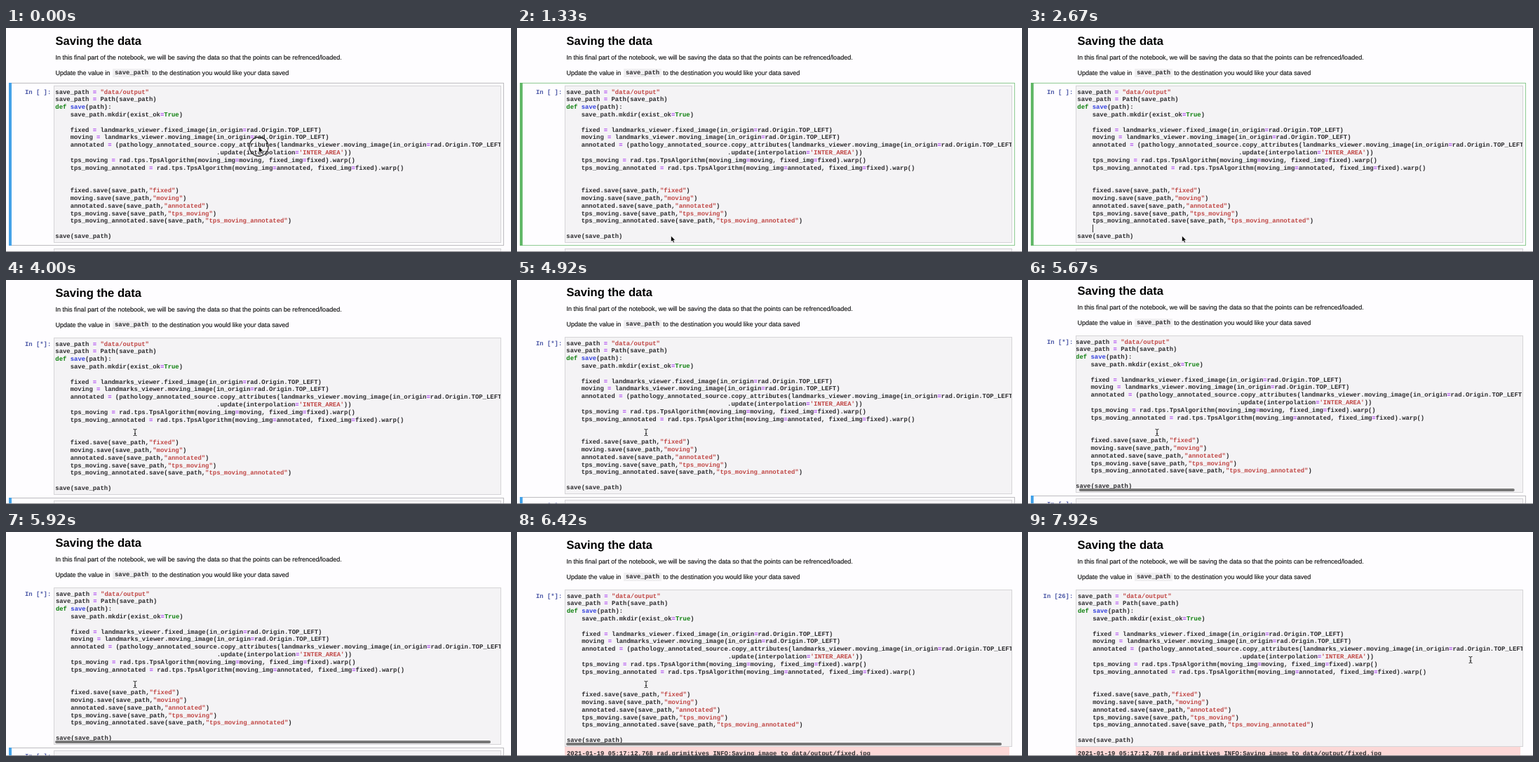
An HTML page for the animation above (8 s loop, 720x319 px).

```html
<!DOCTYPE html>
<html lang="en">
<head>
<meta charset="utf-8">
<title>Saving the data</title>
<style>
  html, body { margin: 0; width: 100%; height: 100%; overflow: hidden; background: #fefdff; }
  #stage { position: relative; width: 720px; height: 319px; overflow: hidden; color: #111;
    font: 9.06px/12px "Liberation Sans", Arial, sans-serif; text-rendering: geometricPrecision; }
  #stage :is(div, pre, h1, p, svg) { position: absolute; box-sizing: border-box; margin: 0; white-space: pre; }
  #page, #follow { left: 0; top: 0; width: 100%; height: 100%; }
  h1 { left: 70.4px; top: 8.5px; font-size: 16.6px; line-height: 20px; color: #000; }
  p { left: 70.4px; top: 58px; -webkit-text-stroke: .15px #111; }
  #stage :is(pre, .prompt, .inline) { font: bold 8.917px/10.815px "Liberation Mono", "Courier New", monospace; color: #2c2b2e; }
  #stage .inline { left: 152px; top: 58px; width: 54px; height: 12px; padding-left: 3px; line-height: 12px; background: #f0eff1; }
  .cell { left: 4px; top: 78px; width: 706px; height: 232px; border: 1px solid #bdbcc0; }
  .cell::before { content: ""; position: absolute; left: -1px; top: -1px; bottom: -1px; width: 3.5px; background: #45a2e8; }
  .edit { border-color: #8fcb93; }
  .edit::before { background: #62b868; }
  #next { top: 309.5px; height: 40px; }
  .box { left: 68px; width: 638px; overflow: hidden; background: #f4f3f5; border: 1px solid #d5d4d7; }
  #stage .prompt { right: 655.7px; top: 86.5px; color: #4b57a6; }
  #code { left: 1.3px; top: 3.5px; }
  .kw { color: #0f800f; } .fn { color: #3340dd; } .op { color: #a838f0; } .str { color: #c04644; }
  #caret { left: 92px; top: 280px; width: 1px; height: 11px; background: #333; }
  #bar { left: 70px; top: 300px; width: 620.5px; height: 4px; border-radius: 2px; background: #777; }
  #log { left: 68px; top: 306px; width: 634px; height: 40px; background: #fcd8d7; }
  #log pre { left: 3px; top: 5px; }
  #edge { left: 0; top: 318px; width: 720px; height: 1px; background: #86858a; }
  #stage svg { left: 0; top: 0; overflow: visible; }
</style>
</head>
<body>
<div id="stage">
  <div id="page">
    <h1>Saving the data</h1>
    <p style="top:36px">In this final part of the notebook, we will be saving the data so that the points can be refrenced/loaded.</p>
    <p>Update the value in</p>
    <div class="inline">save_path</div>
    <p style="left:208.2px">to the destination you would like your data saved</p>
    <div id="selected" class="cell"></div>
    <div id="editing" class="cell edit"></div>
    <div id="follow">
      <div id="next" class="cell"></div>
      <div class="box" style="top:314px;height:30px"></div>
      <div class="prompt" style="top:317.5px">In [ ]:</div>
    </div>
    <div id="prompt" class="prompt"></div>
    <div class="box" style="top:82px;height:224px"><pre id="code"></pre></div>
    <div id="caret"></div>
    <div id="bar"></div>
    <div id="log"><pre>2021-01-19 05:17:12,768 rad.primitives INFO:Saving image to data/output/fixed.jpg</pre></div>
  </div>
  <div id="edge"></div>
  <svg id="pointer" width="1" height="1">
    <circle id="ring" r="13.5" fill="none" stroke="#333" stroke-width="1.3"/>
    <path id="arrow" d="M0 0V8.6L2 6.8L3.5 10L5 9.3L3.6 6.2H6.2Z" fill="#000" stroke="#fff" stroke-width=".6"/>
    <path id="beam" d="M-2.4 -4.6Q0 -4.6 0 -3.4Q0 -4.6 2.4 -4.6M0 -3.6V3.6M-2.4 4.6Q0 4.6 0 3.4Q0 4.6 2.4 4.6M-1.2 1.6H1.2" fill="none" stroke="#222"/>
  </svg>
</div>
<script>
const LOOP = 8000, EDIT = 330, RUN = 3330, OUTPUT = 6250, FINISHED = 6750;
const BLINK = 530, CARET = 380;
const $ = id => document.getElementById(id);

const source = `save_path = "data/output"
save_path = Path(save_path)
def save(path):
    save_path.mkdir(exist_ok=True)

    fixed = landmarks_viewer.fixed_image(in_origin=rad.Origin.TOP_LEFT)
    moving = landmarks_viewer.moving_image(in_origin=rad.Origin.TOP_LEFT)
    annotated = (pathology_annotated_source.copy_attributes(landmarks_viewer.moving_image(in_origin=rad.Origin.TOP_LEFT))
${' '.repeat(43)}.update(interpolation='INTER_AREA'))
    tps_moving = rad.tps.TpsAlgorithm(moving_img=moving, fixed_img=fixed).warp()
    tps_moving_annotated = rad.tps.TpsAlgorithm(moving_img=annotated, fixed_img=fixed).warp()


    fixed.save(save_path,"fixed")
    moving.save(save_path,"moving")
    annotated.save(save_path,"annotated")
    tps_moving.save(save_path,"tps_moving")
    tps_moving_annotated.save(save_path,"tps_moving_annotated")
    
save(save_path)`;

const token = /(?<str>"[^"]*"|'[^']*')|(?<kw>\bdef\b|\bTrue\b)|(?<fn>(?<=def )\w+)|(?<op>=)/g;
$('code').innerHTML = source.replace(token, (text, ...rest) => {
  const groups = rest.at(-1);
  const kind = Object.keys(groups).find(k => groups[k]);
  return `<span class="${kind}">${text}</span>`;
});

const progress = (t, from, to) => Math.min(1, Math.max(0, (t - from) / (to - from)));
const smooth = u => u * u * (3 - 2 * u);
const easeOut = u => 1 - (1 - u) ** 3;
const show = (id, opacity) => { $(id).style.opacity = Number(opacity); };
const move = (id, x, y) => { $(id).style.transform = `translate(${x}px, ${y}px)`; };

const home = { x: 360.5, y: 169 };
const hops = [
  { from: 80, to: 480, x: 219.5, y: 296 },
  { from: 3400, to: 3800, x: 184, y: 217 },
  { from: 6600, to: 7100, x: 316, y: 295 },
  { from: 7260, to: 7580, x: 268, y: 250 },
  { from: 7760, to: 7910, x: 631, y: 182 },
];
const pointerAt = t => hops.reduce((p, hop) => {
  const u = smooth(progress(t, hop.from, hop.to));
  return { x: p.x + (hop.x - p.x) * u, y: p.y + (hop.y - p.y) * u };
}, home);

function draw(t) {
  const running = t >= RUN, printed = t >= OUTPUT, beam = t >= 3500;
  show('selected', t < EDIT);
  show('editing', t >= EDIT && !running);
  show('next', running);
  show('follow', !printed);
  show('log', printed);
  show('caret', t >= CARET && !running && Math.floor((t - CARET) / BLINK) % 2 === 0);
  $('prompt').textContent = `In [${t >= FINISHED ? '26' : running ? '*' : ' '}]:`;

  // The page drifts up and springs back; the code slides sideways and overshoots slightly.
  move('page', 0, -3 * (easeOut(progress(t, 4800, 5800)) - smooth(progress(t, 6000, 6380))));
  const slide = smooth(progress(t, 5050, 5300)), back = smooth(progress(t, 5500, 5800));
  move('code', 7.1 * back - 6.5 * slide, 0);
  move('bar', 7 * (slide - back), 0);
  show('bar', progress(t, 5000, 5080) - progress(t, 6500, 6750));

  const { x, y } = pointerAt(t);
  move('pointer', x, y);
  show('ring', t < 80);
  show('arrow', !beam);
  show('beam', beam);
}

const start = performance.now();
function tick() {
  draw((performance.now() - start) % LOOP);
  requestAnimationFrame(tick);
}
tick();
</script>
</body>
</html>
```
